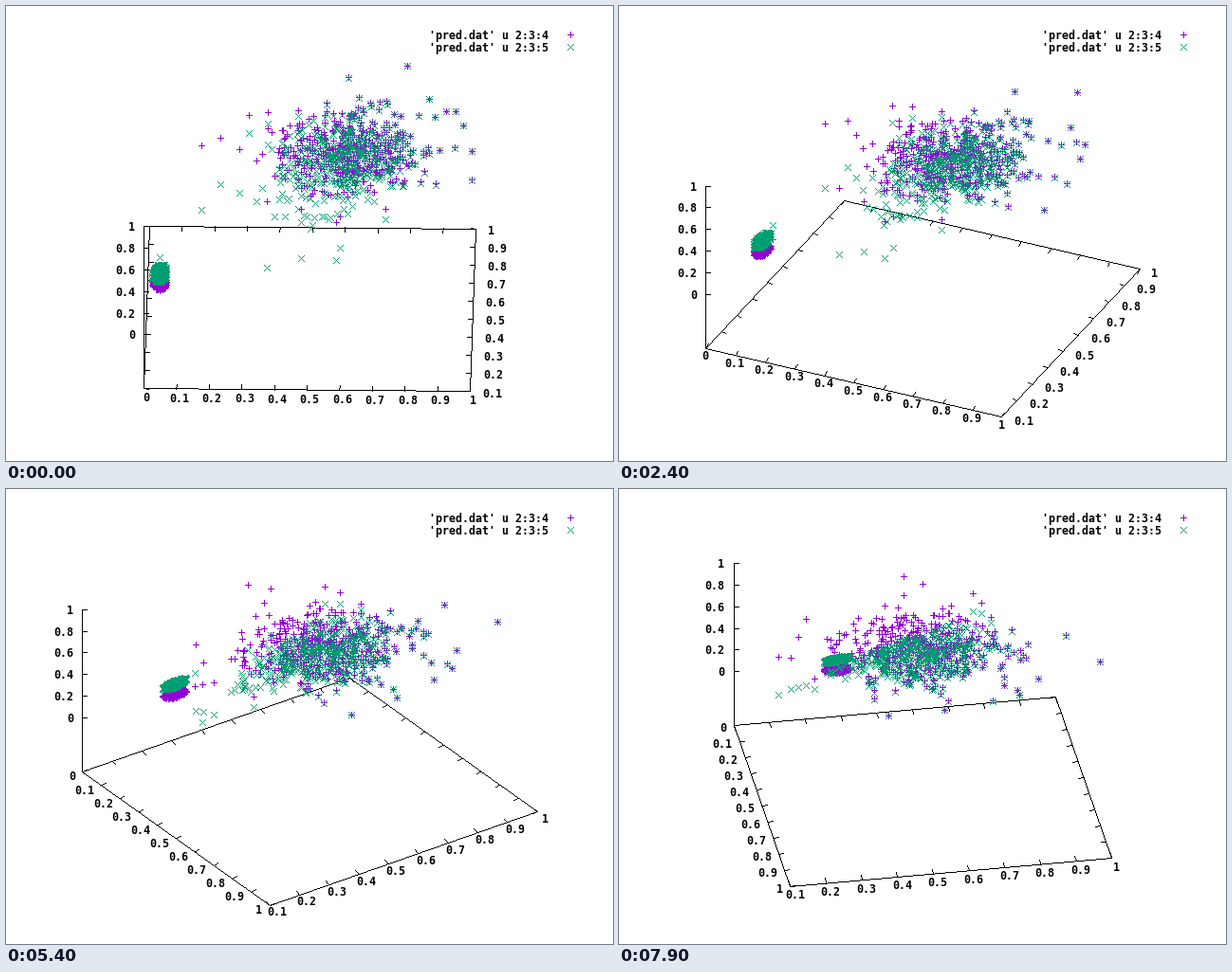
A matplotlib script for the animation above (8 s loop, 640 by 480 pixels).

```python
import matplotlib.pyplot as plt
import numpy as np
from matplotlib.animation import FuncAnimation

W, H, DPI = 640, 480, 100
PX = 72 / DPI                     # points per pixel
FRAMES, INTERVAL = 80, 100
CX, CY = 320, 319                 # centre of the base plane
SIDE, Z_UNIT, Z_GAP = 344, 114, 57
TIC, CHAR, LINE = 5, 7, 8
BLACK, PURPLE, GREEN = (0, 0, 0), (148, 0, 211), (0, 158, 115)

plt.rcParams.update({
    "font.family": "DejaVu Sans Mono",
    "font.weight": "bold",
    "font.size": CHAR / 0.602 * PX,
})

# Base coordinates u, v run from -0.5 to 0.5 on both axes.
STRAYS = np.array([
    (-.331, 0), (-.274, .047), (-.215, -.021), (-.19, .189), (-.161, -.09),
    (-.125, -.34), (-.131, .207), (-.02, -.384), (.089, -.464), (.1, -.428),
    (.24, -.379), (.008, -.3), (-.005, -.245), (.291, .5), (.112, .426),
    (.361, .297), (.497, -.02), (.5, -.195), (.469, .136), (.444, .223),
    (.415, .223), (.38, .187), (.445, 0), (.39, -.22), (.343, -.21),
])
OUTLIER = np.array([(-.457, -.109)])


def blob(rng, n, center, sd, reach):
    """Normal scatter kept inside an ellipse of the given reach."""
    d = rng.normal(0, 1, (4 * n, 2))
    d = d[np.hypot(*d.T) < reach][:n]
    return np.array(center) + d * sd


rng = np.random.default_rng(7)
cloud = np.vstack([blob(rng, 450, (.125, -.005), (.12, .137), 2.3), STRAYS])
knot = np.vstack([blob(rng, 450, (-.457, -.185), (.0135, .024), 1.8), OUTLIER])
U, V = np.vstack([cloud, knot]).T
LABEL = np.r_[np.ones(len(cloud)), np.zeros(len(knot))]
PRED = 1 / (1 + np.exp(-(2.2 + 7.87 * U + 4.9 * V)))

ARM = np.arange(-3, 4)
PLUS = np.r_[ARM, 0 * ARM], np.r_[0 * ARM, ARM]
CROSS = np.r_[ARM, ARM], np.r_[ARM, -ARM]


def project(u, v, rot):
    c, s = np.cos(rot), np.sin(rot)
    return CX + SIDE * (u * c + v * s), CY + SIDE / 2 * (u * s - v * c)


def tic_unit(dx, dy):
    """Tic direction on a stage whose height is 1/sqrt(2) of its width."""
    dy *= np.sqrt(.5)
    n = np.hypot(dx, dy)
    return dx / n, dy / n


canvas = np.full((H, W, 3), 255, np.uint8)


def stamp(x, y, shape, color):
    x, y = np.atleast_1d(np.rint(x)), np.atleast_1d(np.rint(y))
    px = (x[:, None] + shape[0]).astype(int)
    py = (y[:, None] + shape[1]).astype(int)
    canvas[py, px] = color


def line(p, q):
    """One-pixel line without smoothing."""
    (x0, y0), (x1, y1) = np.rint(p), np.rint(q)
    n = int(max(abs(x1 - x0), abs(y1 - y0))) + 1
    xs = np.rint(np.linspace(x0, x1, n)).astype(int)
    ys = np.rint(np.linspace(y0, y1, n)).astype(int)
    canvas[ys, xs] = BLACK


fig = plt.figure(figsize=(W / DPI, H / DPI), dpi=DPI, facecolor="white")
ax = fig.add_axes([0, 0, 1, 1])
ax.axis("off")
image = ax.imshow(canvas, extent=(0, W, H, 0), aspect="auto",
                  interpolation="nearest")


def write(text, x=0, y=0, ha="center"):
    return ax.text(x, y, text, ha=ha, va="baseline", color="black")


LEGEND = [(30, 4, PLUS, PURPLE), (43, 5, CROSS, GREEN)]
for y, col, _, _ in LEGEND:
    write(f"'pred.dat' u 2:3:{col}", 572, y + 5, "right")

x_tics = np.arange(11) / 10
y_tics = np.arange(1, 11) / 10
z_tics = np.arange(6) / 5
x_text = [write(f"{t:g}") for t in x_tics]
y_text = [write(f"{t:g}") for t in y_tics]
z_text = [write(f"{t:g}") for t in z_tics]


def place(label, x, y, ha):
    label.set_position((round(x), round(y + 5)))
    label.set_ha(ha)


def tic(x, y, dx, dy):
    line((x, y), (x + TIC * dx, y + TIC * dy))


def draw_axes(rot):
    corners = [project(u, v, rot) for u, v in
               [(-.5, -.5), (.5, -.5), (.5, .5), (-.5, .5)]]
    for p, q in zip(corners, corners[1:] + corners[:1]):
        line(p, q)

    c, s = np.cos(rot), np.sin(rot)
    deg = np.degrees(rot)

    # x axis at the front, its tics point along +y
    dx, dy = tic_unit(s, -c)
    ha, shift = ("right", -1) if deg > 50.5 else ("center", CHAR / 2)
    for t, label in zip(x_tics, x_text):
        x, y = project(t - .5, -.5, rot)
        tic(x, y, dx, dy)
        tic(*project(t - .5, .5, rot), -dx, -dy)
        place(label, x - CHAR * dx + shift, y - LINE * dy + 1, ha)

    # y axis at the right, its tics point along -x
    dx, dy = tic_unit(-c, -s)
    ha, shift = ("left", CHAR - 1) if deg < 40.5 else ("center", CHAR / 2)
    for t, label in zip(y_tics, y_text):
        v = (t - .1) / .9 - .5
        x, y = project(.5, v, rot)
        tic(x, y, dx, dy)
        tic(*project(-.5, v, rot), -dx, -dy)
        place(label, x - CHAR * dx + shift, y - LINE * dy + 1, ha)

    # z axis stands on the leftmost corner
    x, base = corners[0]
    line((x, base), (x, base - Z_GAP - Z_UNIT))
    for t, label in zip(z_tics, z_text):
        y = base - Z_GAP - Z_UNIT * t
        tic(x, y, 1, 0)
        place(label, x - 9.5, y, "right")


def update(i):
    rot = np.radians(i + 1)
    canvas[:] = 255
    draw_axes(rot)
    x, y = project(U, V, rot)
    stamp(x, y - Z_GAP - Z_UNIT * LABEL, PLUS, PURPLE)
    stamp(x, y - Z_GAP - Z_UNIT * PRED, CROSS, GREEN)
    for row, _, shape, color in LEGEND:
        stamp(595, row, shape, color)
    image.set_data(canvas)
    return ()


anim = FuncAnimation(fig, update, frames=FRAMES, interval=INTERVAL,
                     repeat=True, repeat_delay=0, blit=False)
plt.show()
```
